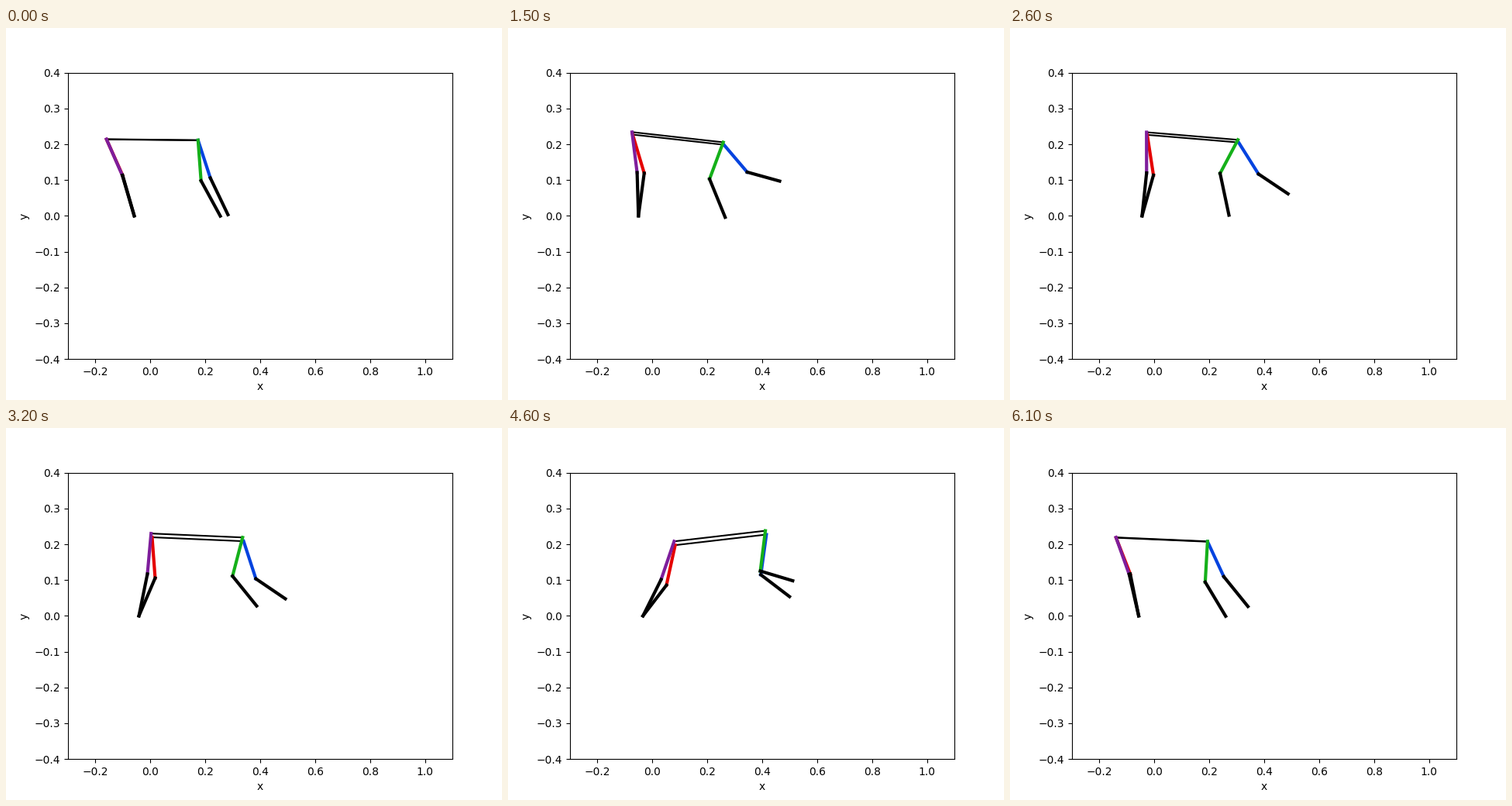
Recreate the animation shown at these times as a matplotlib script. Size 640x480 px, loop 6.2 s.

```python
import numpy as np
import matplotlib.pyplot as plt
from matplotlib.animation import FuncAnimation

FRAMES, INTERVAL = 62, 100
RESTART = 56          # frame at which the gait starts over
LEAD = 2              # the loop opens this far into the gait
BODY, THIGH, SHANK = 0.3335, 0.114, 0.121


def ease(t, start, end):
    """Smooth step from 0 to 1 between two times."""
    u = np.clip((t - start) / (end - start), 0, 1)
    return u * u * (3 - 2 * u)


def limb(length, degrees):
    """Vector of a segment swung forwards from straight down."""
    a = np.radians(degrees)
    return length * np.array([np.sin(a), -np.cos(a)])


def hip(t):
    x = -0.1679 + 0.004 * t + 0.0257 * ease(t, 2, 10) + 0.032 * ease(t, 24, 53)
    y = 0.213 + 0.021 * ease(t, 0, 14) - 4.9e-5 * max(t - 25, 0) ** 2
    return np.array([x, y])


def body(t):
    tilt = -0.1 - 4.8 * ease(t, 0, 12) + 0.0104 * max(t - 17, 0) ** 2
    return limb(BODY, 90 + tilt)


def gap(t):
    """Offset between the two halves of the body."""
    size = (0.0006 + 0.0064 * ease(t, 4, 11) + 0.0064 * ease(t, 26, 41)
            - 0.0068 * ease(t, 41, 57))
    return size * np.array([0.35, -1])


def back_shanks(t):
    purple = 22.8 - 0.9 * t - 5.2 * ease(t, 2, 10) - 9.2 * ease(t, 25, 57)
    red = 22.3 - 0.9 * t - 17 * ease(t, 2, 13) - 7 * ease(t, 27, 40)
    return purple, red


def green_angles(t):
    thigh = 9 - 0.8 * t - 21.3 * ease(t, 0, 11) + 41.5 * ease(t, 28, 40)
    shank = (34 + 4 * ease(t, 0, 5) - 24 * ease(t, 5, 32)
             + 65 * ease(t, 28, 40) - 45 * ease(t, 46, 62))
    return thigh, shank


def blue_angles(t):
    thigh = 21 + 27 * ease(t, 0, 12) - 59 * ease(t, 21, 50)
    shank = 32 + 46 * ease(t, 2, 10) - 15.5 * ease(t, 17, 29) - 18 * ease(t, 44, 60)
    return thigh, shank


def pose(t):
    """Both ends of every segment at gait time t."""
    purple = hip(t)
    green = purple + body(t)
    red, blue = purple + gap(t), green + gap(t)
    segments = {"top": (purple, green), "bottom": (red, blue)}

    heel = np.array([-0.0598 + 0.000534 * t, 0])
    for name, top, shank in zip(("purple", "red"), (purple, red), back_shanks(t)):
        knee = heel - limb(SHANK, shank)
        segments[name] = (top, knee)
        segments[name + "_shank"] = (knee, heel)

    for name, top, angles in (("green", green, green_angles(t)),
                              ("blue", blue, blue_angles(t))):
        thigh, shank = angles
        knee = top + limb(THIGH, thigh)
        segments[name] = (top, knee)
        segments[name + "_shank"] = (knee, knee + limb(SHANK, shank))
    return segments


fig, ax = plt.subplots(figsize=(6.4, 4.8), dpi=100)
ax.set(xlim=(-0.3, 1.1), ylim=(-0.4, 0.4), xlabel="x")
ax.set_ylabel("y", labelpad=4.7)

LEGS = ("red", "blue", "purple", "green")
lines = {}
for name in ("bottom", "top"):
    lines[name], = ax.plot([], [], color="black", lw=1.5)
for name in LEGS:
    lines[name], = ax.plot([], [], color="xkcd:" + name, lw=3)
for name in LEGS:
    lines[name + "_shank"], = ax.plot([], [], color="black", lw=3)


def draw(frame):
    t = frame + LEAD if frame < RESTART else frame - RESTART
    for name, ends in pose(t).items():
        lines[name].set_data(*np.transpose(ends))
    return list(lines.values())


anim = FuncAnimation(fig, draw, frames=FRAMES, interval=INTERVAL, repeat=True, repeat_delay=0)
plt.show()
```
